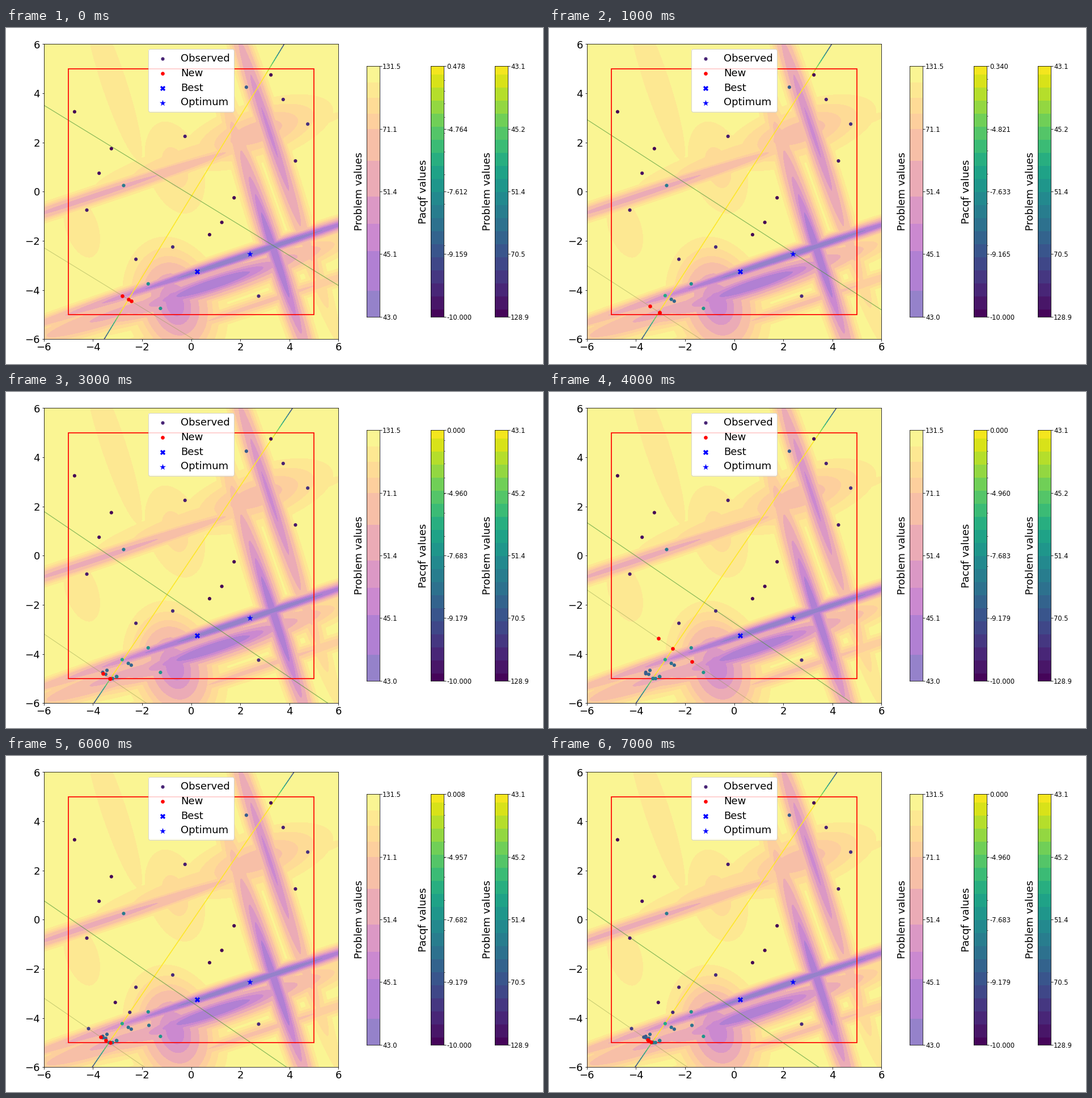
Animation of 947 by 592 pixels, one loop 8000 ms. Source, as a matplotlib script:

```python
import matplotlib.pyplot as plt
import numpy as np
from matplotlib.animation import FuncAnimation
from matplotlib.collections import LineCollection
from matplotlib.colors import ListedColormap
from matplotlib.patches import Rectangle

W, H = 947, 592
TILT = np.radians(18.3)
LOG_SPAN = 1.952

# Gaussian peaks: centre x, centre y, height, width along the tilted axis
PEAKS = [
    (2.38, -2.55, 10, 7.95),
    (3.2, 2.4, 8.1, 0.377),
    (3.43, -2.58, 9.1, 0.4),
    (-4.0, -0.2, 6.6, 7.0),
    (-0.66, 0.98, 3.3, 1.08),
    (2.65, 2.4, 5.3, 2.3),
    (0.08, 1.47, 3.8, 3.6),
    (-3.16, 4.47, 2.95, 0.555),
    (-4.45, -1.47, 2.35, 1.03),
    (-0.65, -4.59, 8.3, 1.21),
    (0.89, -3.76, 9.2, 4.0),
    (-2.7, -4.82, 6.5, 4.2),
    (2.86, -4.54, 5.0, 6.8),
]

# Latin hypercube: one sample per column, in a shuffled row
ROWS = [16, 8, 11, 13, 10, 4, 2, 0, 5, 14, 3, 6, 7, 9, 18, 1, 19, 17, 12, 15]

# x of the three samples added per step; they lie on the lower crossing line
NEW_X = np.array([
    (-2.81, -2.56, -2.44), (-3.43, -3.04, -3.03), (-3.60, -3.48, -3.20),
    (-3.60, -3.31, -3.29), (-3.09, -2.50, -1.72), (-4.18, -3.34, -3.31),
    (-3.68, -3.48, -3.30), (-3.53, -3.47, -3.39),
])
ACQ_MAX = [0.478, 0.3396, 0.017, 0, 0, 0, 0.008, 0]
EXPLORE = 4  # the one step that searches away from the corner

steps = np.arange(len(NEW_X))
slopes = 0.687 - 0.076 * 0.55 ** steps
lows = -3.19 + 0.91 * 0.2 ** steps
lows[EXPLORE] = -1.39

grid = np.linspace(-4.75, 4.75, len(ROWS))
start = np.column_stack([grid, grid[ROWS]])
new_y = np.maximum(lows[:, None] - slopes[:, None] * (NEW_X + 6), -5)
batches = np.stack([NEW_X, new_y], axis=2)


def log_value(x, y):
    """Log of the problem value above its minimum."""
    best = 0
    for cx, cy, height, su in PEAKS:
        dx, dy = x - cx, y - cy
        u = dx * np.cos(TILT) + dy * np.sin(TILT)
        v = dy * np.cos(TILT) - dx * np.sin(TILT)
        bump = height * np.exp(-(u / su) ** 2 / 2 - (v * su / 2) ** 2 / 2)
        best = np.maximum(best, bump)
    return np.log10(1 + (10 - best) ** 2)


def add_axes(left, top, right, bottom):
    return fig.add_axes([left / W, 1 - bottom / H,
                         (right - left) / W, (bottom - top) / H])


def band_edges(rows):
    inner = (509 - np.array(rows, float)) / 442
    return np.concatenate([[0], inner, [1]])


def mids(edges):
    return (edges[1:] + edges[:-1]) / 2


def add_bar(column, edges, cmap, label, ticks):
    left = 636.3 + 113 * column
    ax = add_axes(left, 67.4, left + 22.3, 508.8)
    ax.pcolormesh([0, 1], edges, mids(edges)[:, None], cmap=cmap,
                  vmin=0, vmax=1)
    ax.set(xticks=[], xlim=(0, 1), ylim=(0, 1))
    ax.yaxis.tick_right()
    ax.tick_params(labelsize=11.5, pad=2)
    ax.set_yticks(np.linspace(0, 1, 5), ticks)
    fig.text((left - 7.9) / W, 1 - 288 / H, label, fontsize=18, rotation=90,
             rotation_mode="anchor", ha="center", va="baseline")
    return ax


def acq_ticks(peak):
    return [f"{(11 + peak) ** (k / 4) - 11:.3f}" for k in range(5)]


fig = plt.figure(figsize=(947.01 / 72, 592.01 / 72), dpi=72, facecolor="white")
main = add_axes(66.8, 28.5, 586.2, 548.2)

# field
soft = ListedColormap(0.5 + 0.5 * plt.get_cmap("plasma")(np.linspace(0, 1, 256)))
field_edges = band_edges([463, 393, 345, 297, 234, 178, 151, 123, 96])
levels = field_edges * LOG_SPAN
levels[-1] = 2.1
axis = np.linspace(-6, 6, 450)
main.contourf(axis, axis, log_value(*np.meshgrid(axis, axis)), levels,
              colors=soft(mids(field_edges)))

# white backing keeps the translucent legend from tinting
main.add_patch(Rectangle((-1.75, 3.28), 3.5, 2.49, color="white", lw=0,
                         zorder=1.5))
main.add_patch(Rectangle((-5, -5), 10, 10, fill=False, ec="red", lw=1.7,
                         zorder=2.2))

# moving lines
rise = np.linspace(-6, 6, 121)
ridge = LineCollection([], cmap="viridis", lw=1.6, zorder=2)
ridge.set_array(1 - 0.8 * np.clip((np.abs(mids(rise)) - 4.8) / 1.2, 0, 1))
ridge.set_clim(0, 1)
main.add_collection(ridge)
ends = np.array([-6, 6])
cross, = main.plot([], [], color="#4a9637", alpha=0.65, lw=1.2)
faint, = main.plot([], [], color="#8d9c4c", alpha=0.45, lw=1.1)

# points
viridis = plt.get_cmap("viridis")
seen = main.scatter([0], [0], s=38, lw=0, color=viridis(0.1), zorder=3,
                    label="Observed")
new = main.scatter([0], [0], s=44, lw=0, color="red", zorder=4, label="New")
main.scatter([0.25], [-3.25], s=86, lw=0, marker="X", color="blue", zorder=4,
             label="Best")
main.scatter([2.38], [-2.54], s=132, lw=0, marker="*", color="blue", zorder=4,
             label="Optimum")
main.set(xlim=(-6, 6), ylim=(-6, 6))
main.set_xticks(range(-6, 7, 2))
main.set_yticks(range(-6, 7, 2))
main.tick_params(labelsize=18)
main.tick_params(axis="x", pad=2)
main.legend(loc="upper center", fontsize=18, labelspacing=0.44)

# colour bars
fine_edges = band_edges(np.arange(496, 81, -23))
add_bar(0, field_edges, soft, "Problem values",
        ["43.0", "45.1", "51.4", "71.1", "131.5"])
acq = add_bar(1, fine_edges, viridis, "Pacqf values", acq_ticks(0))
add_bar(2, fine_edges, viridis, "Problem values",
        ["128.9", "70.5", "51.4", "45.2", "43.1"])


def update(i):
    slope = slopes[i]
    past = np.concatenate([start, *batches[:i]])

    pts = np.column_stack([0.49 + slope * (rise - 0.6), rise])
    ridge.set_segments(np.stack([pts[:-1], pts[1:]], axis=1))
    # the upper crossing line follows the mean of the samples so far
    middle = np.mean(past[:, 1] + slope * past[:, 0]) - 0.15
    cross.set_data(ends, middle - slope * ends)
    faint.set_data(ends, lows[i] - slope * (ends + 6))

    seen.set_offsets(past)
    seen.set_color(viridis(np.clip(1 - log_value(*past.T) / 1.94, 0, 1)))
    new.set_offsets(batches[i])

    peak = ACQ_MAX[i]
    acq.set_yticklabels(acq_ticks(peak))
    acq.set_yticks(np.log(np.arange(2, 11)) / np.log(11 + peak), minor=True)
    return ridge, cross, faint, seen, new


anim = FuncAnimation(fig, update, frames=len(steps), interval=1000,
                     repeat=True, repeat_delay=0, blit=False)
plt.show()
```
